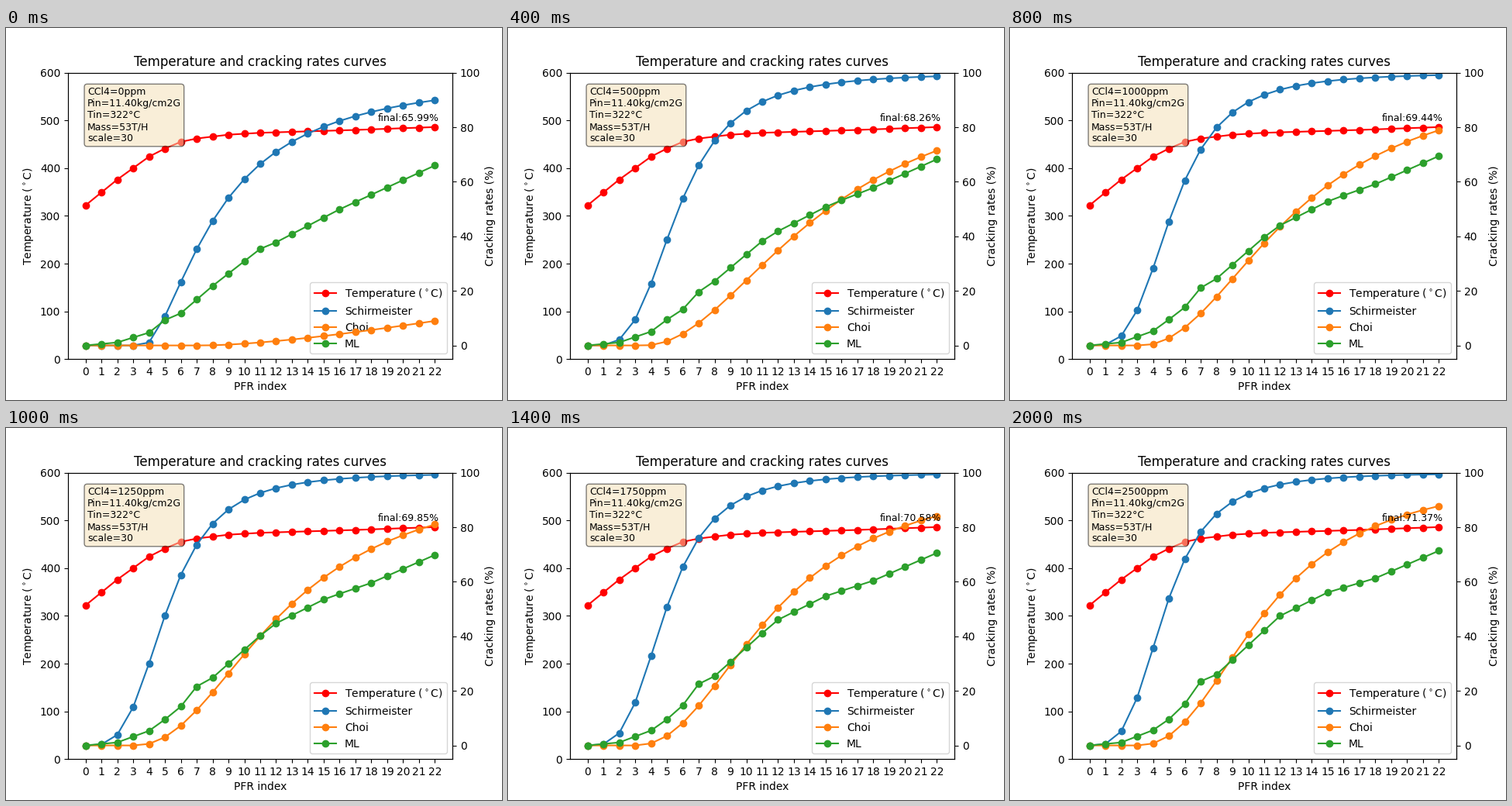
Animation, 640 px wide and 480 px high, one loop 2100 ms. Source, as a matplotlib script:

```python
import numpy as np
import matplotlib.pyplot as plt
from matplotlib.animation import FuncAnimation

FRAMES = 21
STEP_PPM = 125
MAX_PPM = (FRAMES - 1) * STEP_PPM
index = np.arange(23)


def through(points):
    """Straight segments through (index, value) key points."""
    return np.interp(index, *zip(*points))


temperature = through([(0, 322), (2, 376), (4, 424), (5, 441), (6, 455),
                       (7, 462), (9, 470), (11, 474), (17, 480), (22, 486)])


def kinetics(knee, delay, half, order):
    """Log-logistic conversion whose shape shifts with the log of the dose.

    delay and order are (start, end, ease); half is the (start, end) index
    of 50 % conversion, which moves linearly in 1 / index.
    """
    def ease(span, left):
        start, end, power = span
        return end + (start - end) * left ** power

    def rates(ppm):
        left = 1 - np.log1p(ppm / knee) / np.log1p(MAX_PPM / knee)
        lag = ease(delay, left)
        middle = 1 / ease((1 / half[0], 1 / half[1], 1), left)
        odds = (np.maximum(index - lag, 0) / (middle - lag)) ** ease(order, left)
        return 100 * odds / (1 + odds)

    return rates


ml_low = through([(0, 0), (2, 1.1), (4, 4.7), (5, 9.3), (6, 11.8), (8, 21.8),
                  (11, 35.4), (12, 37.8), (16, 49.9), (22, 65.99)])
ml_high = through([(0, 0), (2, 1.1), (4, 5.6), (5, 9.6), (6, 15.2), (7, 23.5),
                   (8, 26), (12, 47.5), (15, 56.1), (18, 61.3), (22, 71.37)])
ML_PPM = [0, 250, 500, 1000, 1500, 2000, 2500]
ML_FINAL = [65.99, 66.76, 68.26, 69.44, 70.26, 70.90, 71.37]


def ml_rates(ppm):
    end = np.interp(ppm, ML_PPM, ML_FINAL)
    share = (end - ml_low[-1]) / (ml_high[-1] - ml_low[-1])
    return ml_low + share * (ml_high - ml_low)


models = [
    ("Schirmeister", "tab:blue",
     kinetics(45, (3.7, 0, 2), (8.49, 4.77), (1.63, 3.35, 1.75))),
    ("Choi", "tab:orange",
     kinetics(14, (7.5, 3, 1.6), (72.65, 11.22), (1.54, 2.35, 0.6))),
    ("ML", "tab:green", ml_rates),
]

fig, ax = plt.subplots(figsize=(6.4, 4.8), dpi=100)
ax2 = ax.twinx()

ax.set_title("Temperature and cracking rates curves")
ax.set_xlabel("PFR index")
ax.set_ylabel(r"Temperature ($^\circ$C)")
ax2.set_ylabel("Cracking rates (%)")
ax.set_ylim(0, 600)
ax2.set_ylim(-5, 100)

lines = ax.plot(index, temperature, "o-", color="red",
                label=r"Temperature ($^\circ$C)")
for name, color, rates in models:
    lines += ax2.plot(index, rates(0), "o-", color=color, label=name)
ax.set_xticks(index)
ax.legend(handles=lines, loc="lower right")

info = ax.text(0.05, 0.95, "", transform=ax.transAxes, fontsize=9, va="top",
               bbox=dict(boxstyle="round", facecolor="wheat", alpha=0.5))
final = ax2.text(18.4, 82.3, "", fontsize=9)


def update(frame):
    ppm = frame * STEP_PPM
    for line, (_, _, rates) in zip(lines[1:], models):
        line.set_ydata(rates(ppm))
    info.set_text(f"CCl4={ppm}ppm\nPin=11.40kg/cm2G\nTin=322°C\n"
                  "Mass=53T/H\nscale=30")
    final.set_text(f"final:{ml_rates(ppm)[-1]:.2f}%")
    return [*lines, info, final]


anim = FuncAnimation(fig, update, frames=FRAMES, interval=100, repeat=True,
                     repeat_delay=0)
plt.show()
```
